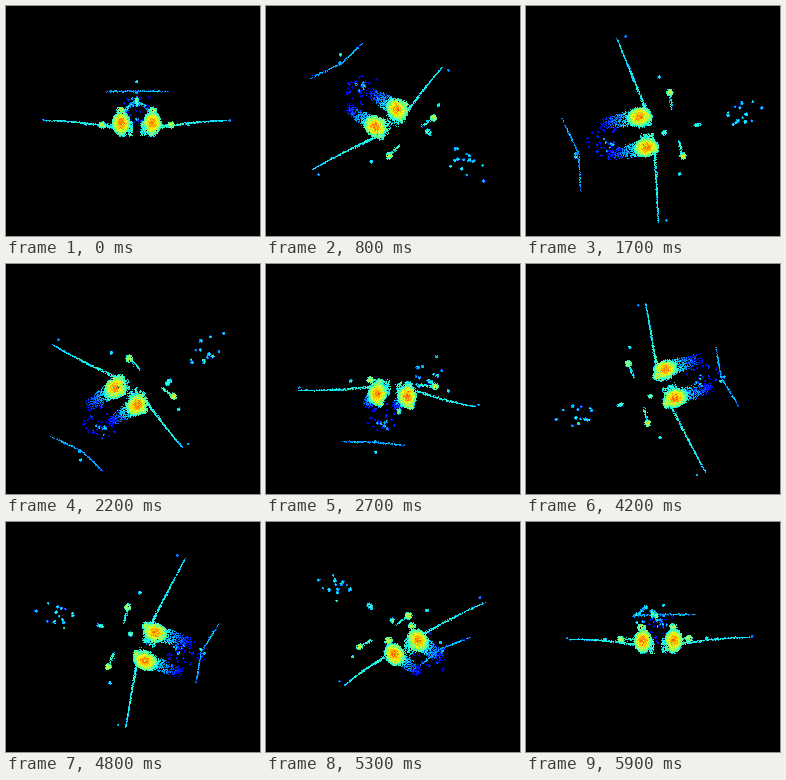
A matplotlib script that plays this animation: 254x230 px, repeating every 6000 ms.

```python
import numpy as np
import matplotlib.pyplot as plt
from matplotlib.animation import FuncAnimation

# a power of two keeps width and height exact in pixels
W, H, DPI = 254, 230, 64
FRAMES, INTERVAL = 60, 100
CENTER = (130.8, 122.2)
CAMERA = 520.0

rng = np.random.default_rng(12)
parts = []


def add(u, v, w, heat):
    """Store points: u to the side, v up, w towards the nose."""
    parts.append(np.column_stack(np.broadcast_arrays(u, v, w, heat)))


def ball(n):
    p = rng.normal(size=(n, 3))
    p /= np.linalg.norm(p, axis=1, keepdims=True)
    return p * rng.random((n, 1)) ** (1 / 3)


def speck(u, v, w, size, heat, n=None):
    """Small ellipsoid, hottest in the middle."""
    size = np.broadcast_to(size, 3)
    n = n or int(8 + 9 * size.max() ** 2)
    p = ball(n)
    r = np.linalg.norm(p, axis=1)
    q = p * size + (u, v, w)
    values = heat * (1.05 - 0.5 * r) + rng.normal(0, 0.04, n)
    add(q[:, 0], q[:, 1], q[:, 2], values)


def engine(side):
    n = 1700
    p = ball(n)
    r = np.linalg.norm(p, axis=1)
    heat = 0.76 - 0.42 * r ** 1.7 + rng.normal(0, 0.05, n)
    add(side * (16 + 9.5 * p[:, 0]), 5 + 12.5 * p[:, 1],
        -14 + 12.5 * p[:, 2], heat)
    speck(side * 16, 18, -5, (4.5, 4, 4.5), 0.64, 120)
    speck(side * 15, -6, -8, (5, 3, 5), 0.55, 80)

    # cooling trail behind the engine
    n = 520
    k = rng.random(n) ** 1.6
    a = rng.uniform(0, 2 * np.pi, n)
    r = (8.5 - 3 * k) * np.sqrt(rng.random(n))
    add(side * (16 + r * np.cos(a)), 5 + r * np.sin(a), -20 - 34 * k,
        0.4 - 0.33 * k + rng.normal(0, 0.05, n))

    # flank of the fuselage
    n = 130
    add(side * rng.uniform(4, 9, n), rng.uniform(-8, 7, n),
        rng.uniform(-18, -4, n), rng.normal(0.36, 0.07, n))


def wing(side):
    n = 330
    k = rng.random(n) ** 1.1
    jitter = rng.normal(0, 0.45, (2, n)) * (1.5 - k)
    add(side * (24 + 71 * k),
        0.8 + 7 * np.sin(k * np.pi / 2) + jitter[0],
        -7 - 11.5 * k + jitter[1],
        0.36 - 0.05 * k + rng.normal(0, 0.045, n))
    speck(side * 95, 8, -10, 1.1, 0.34)
    speck(side * 50, 4, 13, 1.6, 0.46)


def foreplane(side):
    speck(side * 33, 3, 20, 3.6, 0.66, 110)
    n = 55
    k = rng.random(n)
    add(side * (33 - 17 * k), 3 + rng.normal(0, 0.6, n),
        20 - k + rng.normal(0, 0.7, n), rng.normal(0.36, 0.05, n))


def tail():
    n = 210
    u = rng.uniform(-36.5, 36.5, n)
    add(u, 42.3 + rng.normal(0, 0.45, n),
        -74 - 7 * np.abs(u) / 36.5 + rng.normal(0, 0.35, n),
        rng.normal(0.25, 0.05, n))
    speck(0, 53, -75, 1.6, 0.44)
    speck(0, 41, -77, 1.7, 0.4)
    for _ in range(7):
        speck(rng.uniform(-6, 6), rng.uniform(22, 34),
              rng.uniform(-51, -42), (0.9, 1.6, 1), 0.4, 12)
    for _ in range(26):
        speck(rng.uniform(-16, 16), rng.uniform(6, 34),
              rng.uniform(-72, -38), 1.3, rng.uniform(0.08, 0.22), 8)


def nose():
    speck(0, 7, 105, 1.5, 0.36)
    for a in np.linspace(0, np.pi, 13):
        speck(9.5 * np.cos(a), 11 + 11 * np.sin(a), rng.uniform(68, 98),
              rng.uniform(0.9, 1.8), rng.uniform(0.3, 0.45))
    speck(0, 24, 40, (1.8, 4.5, 4.2), 0.5, 80)
    speck(0, 28, 7, (2.3, 3.5, 3), 0.53, 75)


for s in (-1, 1):
    engine(s)
    wing(s)
    foreplane(s)
tail()
nose()
cloud = np.concatenate(parts)
points, heat = cloud[:, :3], np.clip(cloud[:, 3], 0.05, 0.92)


def render(i):
    t = 2 * np.pi * i / FRAMES
    c, s = np.cos(t), np.sin(t)
    yaw = np.array([[c, 0, s], [0, 1, 0], [-s, 0, c]])
    pitch = np.array([[1, 0, 0], [0, c, -s], [0, s, c]])
    x, y, z = pitch @ yaw @ points.T
    scale = CAMERA / (CAMERA - z)
    col = np.floor(CENTER[0] + x * scale).astype(int)
    row = np.floor(CENTER[1] - y * scale).astype(int)
    ok = (col >= 0) & (col < W) & (row >= 0) & (row < H)
    grid = np.full((H, W), -1.0)
    np.maximum.at(grid, (row[ok], col[ok]), heat[ok])
    return grid


fig = plt.figure(figsize=(W / DPI, H / DPI), dpi=DPI, facecolor="black")
ax = fig.add_axes([0, 0, 1, 1])
ax.axis("off")
jet = plt.get_cmap("jet").with_extremes(under="black")
image = ax.imshow(render(0), cmap=jet, vmin=0, vmax=1,
                  interpolation="nearest", aspect="auto")


def draw(i):
    image.set_data(render(i))
    return (image,)


anim = FuncAnimation(fig, draw, frames=FRAMES, interval=INTERVAL,
                     repeat=True, repeat_delay=0, blit=True)
plt.show()
```
